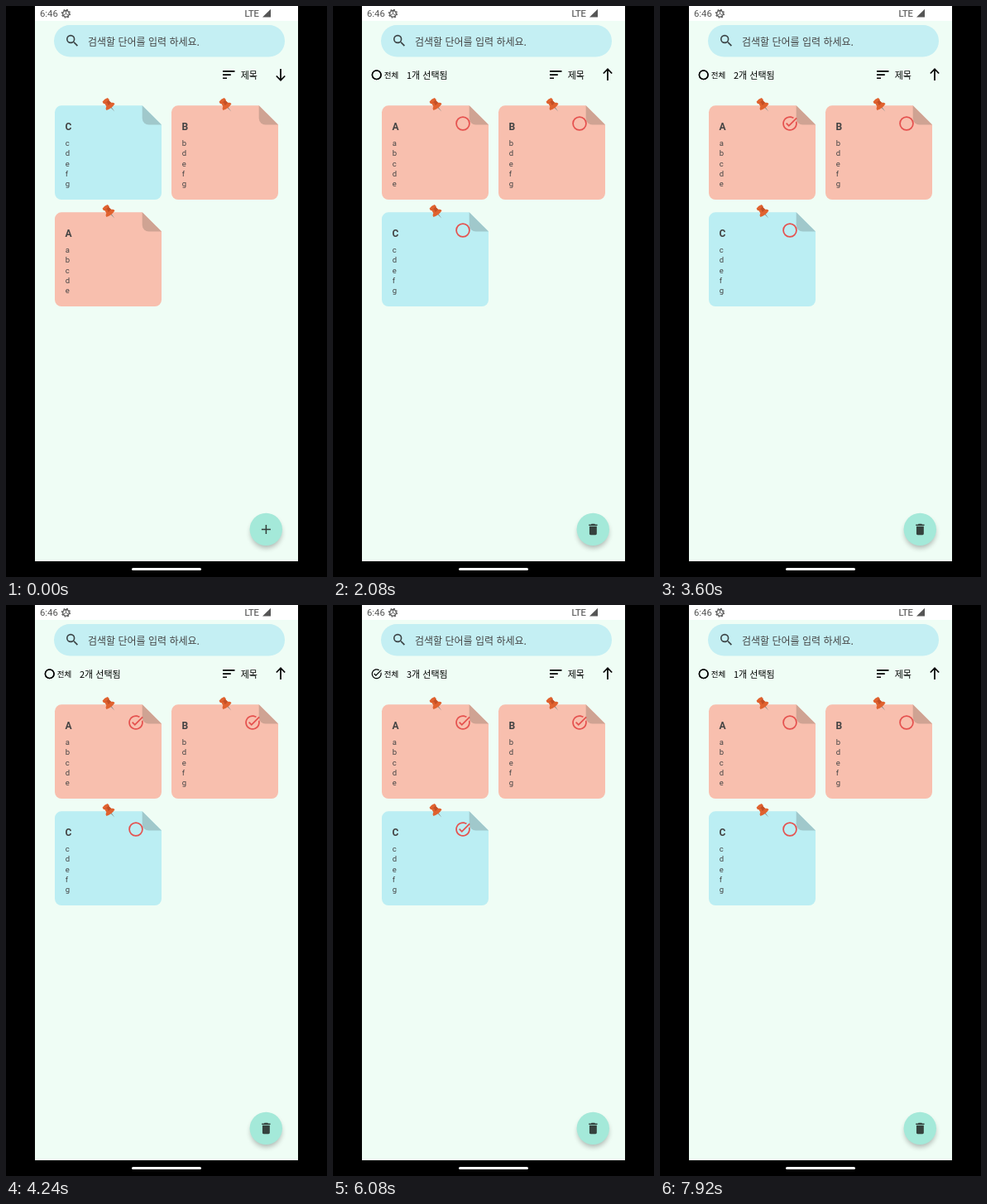
Animation, 388 px wide and 690 px high, one loop 8 s. Source, as an HTML page:

```html
<!DOCTYPE html>
<html lang="ko">
<head>
<meta charset="utf-8">
<title>메모 목록</title>
<style>
  html, body { margin: 0; width: 100%; height: 100%; overflow: hidden; background: #000; }
  svg { display: block; width: 388px; height: 690px; }
  text { font-family: "Noto Sans CJK KR", "Noto Sans CJK", sans-serif; }
  .latin, .card text { font-family: Roboto, sans-serif; fill: #555; }
  .card text { fill: #444; font-size: 9.5px; }
  .card .title { font-size: 12px; font-weight: 700; }
</style>
</head>
<body>
<svg viewBox="0 0 388 690" xmlns="http://www.w3.org/2000/svg">
  <defs>
    <filter id="blur" x="-50%" y="-50%" width="200%" height="200%"><feGaussianBlur stdDeviation="3"/></filter>
    <g id="ring"><circle r="9" fill="none" stroke-width="2"/></g>
    <g id="tick" stroke="none">
      <path transform="translate(-12 -12)" d="M22 5.18 10.59 16.6 6.35 12.36l1.41-1.41 2.83 2.83 10-10zM19.79 10.22C19.92 10.79 20 11.39 20 12c0 4.42-3.58 8-8 8s-8-3.58-8-8 3.58-8 8-8c1.58 0 3.04.46 4.28 1.25l1.44-1.44C16.1 2.67 14.13 2 12 2 6.48 2 2 6.48 2 12s4.48 10 10 10 10-4.48 10-10c0-1.19-.22-2.33-.6-3.39z"/>
    </g>
    <g id="pin" transform="translate(119.7 113.4) rotate(-38)">
      <path d="M-.7 10h1.6L.4 18.2z" fill="#8d8f8c"/>
      <path d="M-4 0Q0-1.5 4 0L4.2 2.4 3.1 3.6 3.6 7.2Q6.4 8.4 6.4 11Q0 13.2-6.4 11Q-6.4 8.4-3.6 7.2L-3.1 3.6-4.2 2.4z" fill="#e0622f"/>
      <path d="M-4.2 2.4Q0 4 4.2 2.4L3.1 3.6 3.6 7.2Q0 8.4-1 7.6L0 3.8z" fill="#c44f25"/>
    </g>
  </defs>

  <rect width="388" height="690"/>
  <rect x="35" width="318" height="671" fill="#effdf5"/>
  <rect x="35" width="318" height="18" fill="#fff"/>
  <rect x="152" y="679" width="84" height="3" rx="1.5" fill="#fff"/>

  <!-- status bar -->
  <text class="latin" x="41" y="13.4" font-size="11.3">6:46</text>
  <g fill="none" stroke="#555">
    <circle cx="72.5" cy="9.3" r="3.8" stroke-width="1.3"/>
    <circle cx="72.5" cy="9.3" r="4.9" stroke-width="1.3" stroke-dasharray="1.9 1.95"/>
    <path d="M72.5 9.3v-3.6M72.5 9.3l-3 2M72.5 9.3l3 2" stroke-width=".9"/>
  </g>
  <text class="latin" x="288.5" y="13.2" font-size="11" stroke="#555" stroke-width=".2">LTE</text>
  <path d="M310 13.4h10V3.8z" fill="#555"/>

  <!-- search field -->
  <rect x="58" y="23" width="279" height="38.5" rx="19.2" fill="#c4eff3"/>
  <path transform="translate(70.6 32.4) scale(.8)" fill="#3c4446" d="M15.5 14h-.79l-.28-.27A6.47 6.47 0 0 0 16 9.5 6.5 6.5 0 1 0 9.5 16c1.61 0 3.09-.59 4.23-1.57l.27.28v.79l5 4.99L20.49 19zm-6 0a4.5 4.5 0 1 1 0-9 4.5 4.5 0 0 1 0 9z"/>
  <text x="99" y="48.4" font-size="12" fill="#444">검색할 단어를 입력 하세요.</text>

  <!-- sort controls -->
  <path d="M262 78h14.5v1.7H262zM262 82.2h9.8v1.7H262zM262 86.4h5v1.7H262z"/>
  <text x="283.7" y="87.8" font-size="11">제목</text>
  <path id="arrow" d="M332 90V76.5M326.8 81.5 332 76.2l5.2 5.3" fill="none" stroke="#000" stroke-width="1.7"/>

  <!-- selection bar -->
  <g id="bar">
    <g transform="translate(52.7 83.2) scale(.6)" stroke="#000">
      <use id="allOff" href="#ring" stroke="#000"/>
      <circle id="allBold" r="8.8" fill="none" stroke-width="2.6"/>
      <use id="allOn" href="#tick"/>
    </g>
    <text x="61.8" y="86.8" font-size="9.5">전체</text>
    <text id="count" x="89" y="88" font-size="11"></text>
  </g>

  <g id="cards"></g>

  <!-- floating button -->
  <circle cx="314.5" cy="636.5" r="18.5" fill="#000" opacity=".28" filter="url(#blur)"/>
  <circle cx="314.3" cy="632.4" r="19.7" fill="#a4e9d9"/>
  <path id="plus" d="M314.4 627v11M308.9 632.5h11" stroke="#333d3a" stroke-width="1.5"/>
  <path id="trash" transform="translate(305.5 623.6) scale(.74)" fill="#35423e" d="M6 19c0 1.1.9 2 2 2h8c1.1 0 2-.9 2-2V7H6zM19 4h-3.5l-1-1h-5l-1 1H5v2h14z"/>
</svg>
<script>
const LOOP = 8000;
const PINK = ['#f8bfae', '#cfa393'], BLUE = ['#bbeef3', '#a0c8cb'];
const NOTES = { A: ['abcde', PINK], B: ['bdefg', PINK], C: ['cdefg', BLUE] };
const SLOTS = [[0, 0], [141, 0], [0, 129]];

// Each step: start time and the values that change there.
const STEPS = [
  [0, { order: 'CBA', up: false, select: false, count: 0, checked: '' }],
  [640, { order: 'ABC', up: true }],
  [2080, { select: true, count: 1 }],
  [3040, { checked: 'A' }],
  [3600, { count: 2 }],
  [4080, { checked: 'AB' }],
  [5040, { count: 3 }],
  [6000, { checked: 'ABC' }],
  [6880, { count: 0, checked: '' }],
  [7920, { count: 1 }]
];

const $ = id => document.getElementById(id);
const show = (el, on) => el.setAttribute('visibility', on ? 'visible' : 'hidden');

function cardMarkup(name) {
  const [body, [paper, fold]] = NOTES[name];
  const lines = [...body].map((c, i) => `<text x="71.7" y="${169 + 12.25 * i}">${c}</text>`).join('');
  return `<g class="card" id="card${name}">
    <path d="M67 120.3H164.7L188 143.5V226a8 8 0 0 1-8 8H67a8 8 0 0 1-8-8V128.3a8 8 0 0 1 8-8z" fill="${paper}"/>
    <path d="M164.7 120.3 188 143.5H172.7a8 8 0 0 1-8-8z" fill="${fold}"/>
    <use href="#pin"/>
    <text class="title" x="71.5" y="150.2">${name}</text>${lines}
    <g transform="translate(157 142) scale(.88)" fill="#e5524f" stroke="#e5524f">
      <use id="off${name}" href="#ring"/><use id="on${name}" href="#tick"/>
    </g></g>`;
}

$('cards').innerHTML = Object.keys(NOTES).map(cardMarkup).join('');

function stateAt(t) {
  return Object.assign({}, ...STEPS.filter(([at]) => at <= t).map(([, change]) => change));
}

function render(s) {
  [...s.order].forEach((name, i) => {
    const on = s.checked.includes(name);
    $('card' + name).setAttribute('transform', `translate(${SLOTS[i]})`);
    show($('off' + name), s.select && !on);
    show($('on' + name), s.select && on);
  });
  const all = s.checked.length === 3;
  $('bar').style.display = s.select ? '' : 'none';
  show($('allOff'), !all);
  show($('allBold'), !all);
  show($('allOn'), all);
  $('count').textContent = `${s.count}개 선택됨`;
  $('arrow').setAttribute('transform', s.up ? '' : 'rotate(180 332 83)');
  show($('plus'), !s.select);
  show($('trash'), s.select);
}

const start = performance.now();
let last = -1;
function frame() {
  const t = (performance.now() - start) % LOOP;
  const step = STEPS.filter(([at]) => at <= t).length;
  if (step !== last) {
    last = step;
    render(stateAt(t));
  }
  requestAnimationFrame(frame);
}
frame();
</script>
</body>
</html>
```
